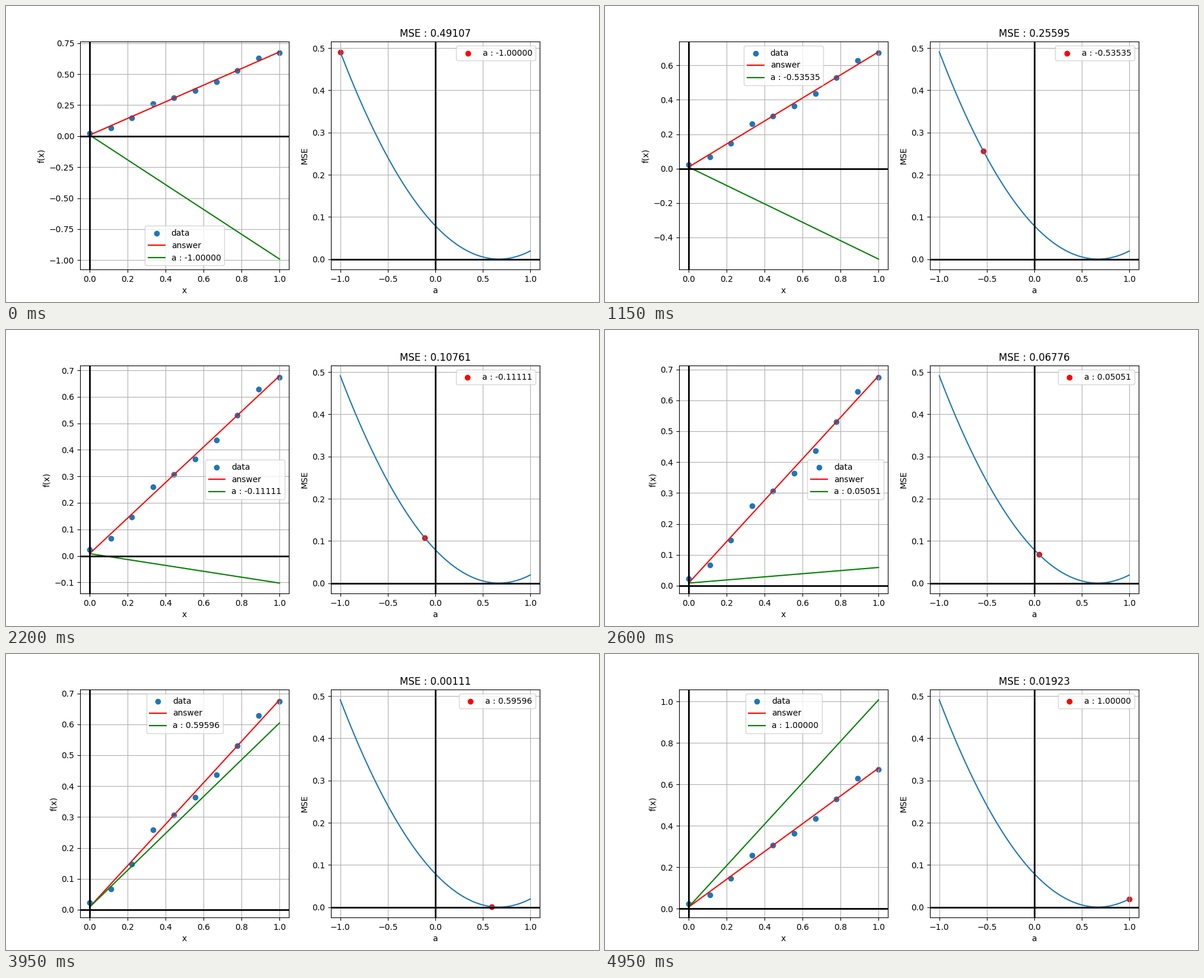
These frames come from a looping animation (1000x500 px, 5000 ms). A matplotlib script:

```python
import matplotlib.pyplot as plt
import numpy as np
from matplotlib.animation import FuncAnimation

FRAMES = 100
SLOPE, BIAS, MIN_LOSS = 0.670505, 0.0085, 0.0001322

x = np.linspace(0, 1, 10)
noise = np.array([151, -163, -102, 274, 3, -168, -196, 4, 246, -50]) * 1e-4
data = SLOPE * x + BIAS + noise
slopes = np.linspace(-1, 1, FRAMES)


def loss(a):
    """Half the mean squared error of the line a * x + BIAS."""
    return np.mean(x ** 2) / 2 * (a - SLOPE) ** 2 + MIN_LOSS


def finish(ax, xlabel, ylabel):
    # The zero lines come last so that they do not widen the limits.
    ax.axhline(0, color="black", lw=2)
    ax.axvline(0, color="black", lw=2)
    ax.set_xlabel(xlabel)
    ax.set_ylabel(ylabel)
    ax.grid()
    ax.legend()


def draw_fit(ax, a):
    ax.clear()
    ax.scatter(x, data, label="data")
    ax.plot(x, SLOPE * x + BIAS, color="red", label="answer")
    ax.plot(x, a * x + BIAS, color="green", label=f"a : {a:.5f}")
    finish(ax, "x", "f(x)")


def draw_loss(ax, a):
    ax.clear()
    ax.plot(slopes, loss(slopes))
    ax.scatter(a, loss(a), color="red", label=f"a : {a:.5f}")
    ax.set_title(f"MSE : {loss(a):.5f}")
    finish(ax, "a", "MSE")


def update(frame):
    draw_fit(fit_ax, slopes[frame])
    draw_loss(loss_ax, slopes[frame])


fig, (fit_ax, loss_ax) = plt.subplots(1, 2, figsize=(10, 5), dpi=100)
anim = FuncAnimation(fig, update, frames=FRAMES, interval=50,
                     init_func=lambda: None, repeat=True, repeat_delay=0)
plt.show()
```
